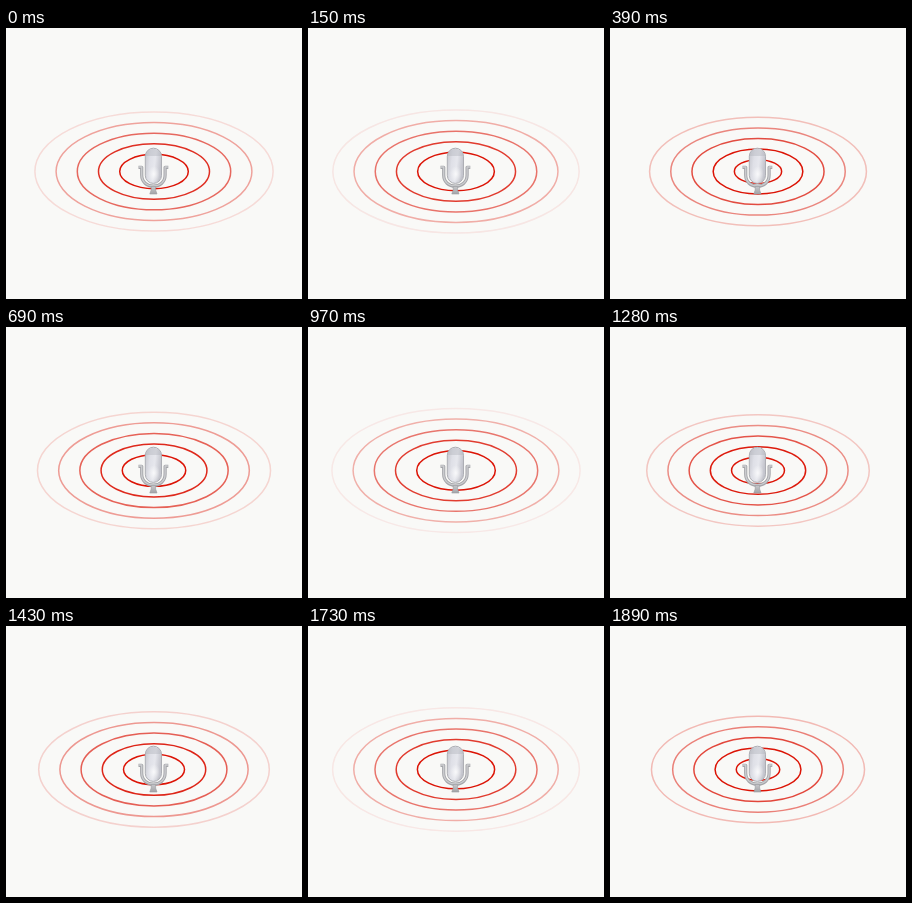
Recreate the animation shown at these times as an HTML page. Size 296x271 px, loop 1920 ms.

```html
<!DOCTYPE html>
<html lang="en">
<head>
<meta charset="utf-8">
<title>Recording</title>
<style>
  html, body { margin: 0; width: 100%; height: 100%; overflow: hidden; background: #f9f9f7; }
  svg { display: block; width: 296px; height: 271px; }
</style>
</head>
<body>
<svg viewBox="0 0 296 271">
  <defs>
    <linearGradient id="head" x1="0" y1="0" x2="1" y2="0.25">
      <stop offset="0" stop-color="#c3c4cb"/>
      <stop offset="0.35" stop-color="#dfe0e7"/>
      <stop offset="0.65" stop-color="#e6e7ed"/>
      <stop offset="1" stop-color="#c4c5cd"/>
    </linearGradient>
    <linearGradient id="metal" x1="0" y1="0" x2="0" y2="1">
      <stop offset="0" stop-color="#c6c7ca"/>
      <stop offset="1" stop-color="#a3a4a8"/>
    </linearGradient>
    <radialGradient id="shine">
      <stop offset="0" stop-color="#fff" stop-opacity="0.75"/>
      <stop offset="1" stop-color="#fff" stop-opacity="0"/>
    </radialGradient>
  </defs>

  <g id="rings" fill="none" stroke="#dc1406" stroke-width="1.5"></g>

  <g id="mic">
    <g fill="none" stroke-linejoin="round">
      <path d="M132.5 139.3H135.7V147C135.7 154 140.8 158.2 147.4 158.2S159.1 154 159.1 147V139.3H162.3" stroke="#a5a6aa" stroke-width="3.2"/>
      <path d="M133 139H135.7V147C135.7 154 140.8 158 147.4 158S159.1 154 159.1 147V139H161.8" stroke="#cccdd0" stroke-width="1.3"/>
    </g>
    <path d="M145.2 158.5H149.6V162L151 166H143.8L145.2 162Z" fill="url(#metal)" stroke="#999a9e" stroke-width="0.6"/>
    <rect x="139.3" y="120.2" width="16.2" height="35.2" rx="8.1" fill="url(#head)" stroke="#adaeb4"/>
    <path d="M140 128C140.5 118.8 154.3 118.8 154.8 128Z" fill="#b0b1ba" opacity="0.4"/>
    <ellipse cx="148" cy="146" rx="6" ry="8" fill="url(#shine)"/>
  </g>
</svg>
<script>
  const LOOP = 1920;
  const STEPS = [0, 150, 270, 390, 540, 690, 820, 970, 1120, 1280, 1430, 1580, 1730, 1890];
  const COUNT = 5, GAP = 21.2, START = 20, SPEED = 0.027, OFFSET = 14.3;

  const group = document.getElementById('rings');
  const rings = Array.from({ length: COUNT }, () => {
    const ring = document.createElementNS('http://www.w3.org/2000/svg', 'ellipse');
    ring.setAttribute('cx', 148);
    ring.setAttribute('cy', 143.5);
    return group.appendChild(ring);
  });

  function draw(now) {
    const time = now % LOOP;
    const held = STEPS.findLast(step => step <= time);
    const first = START + (OFFSET + held * SPEED) % GAP;
    rings.forEach((ring, i) => {
      const radius = first + i * GAP;
      ring.setAttribute('rx', radius);
      ring.setAttribute('ry', radius / 2);
      // Rings fade out as they spread.
      ring.setAttribute('opacity', Math.max(0, Math.min(1, (130 - radius) / 85)));
    });
  }

  const begin = performance.now();
  function tick() {
    draw(performance.now() - begin);
    requestAnimationFrame(tick);
  }
  tick();
</script>
</body>
</html>
```
